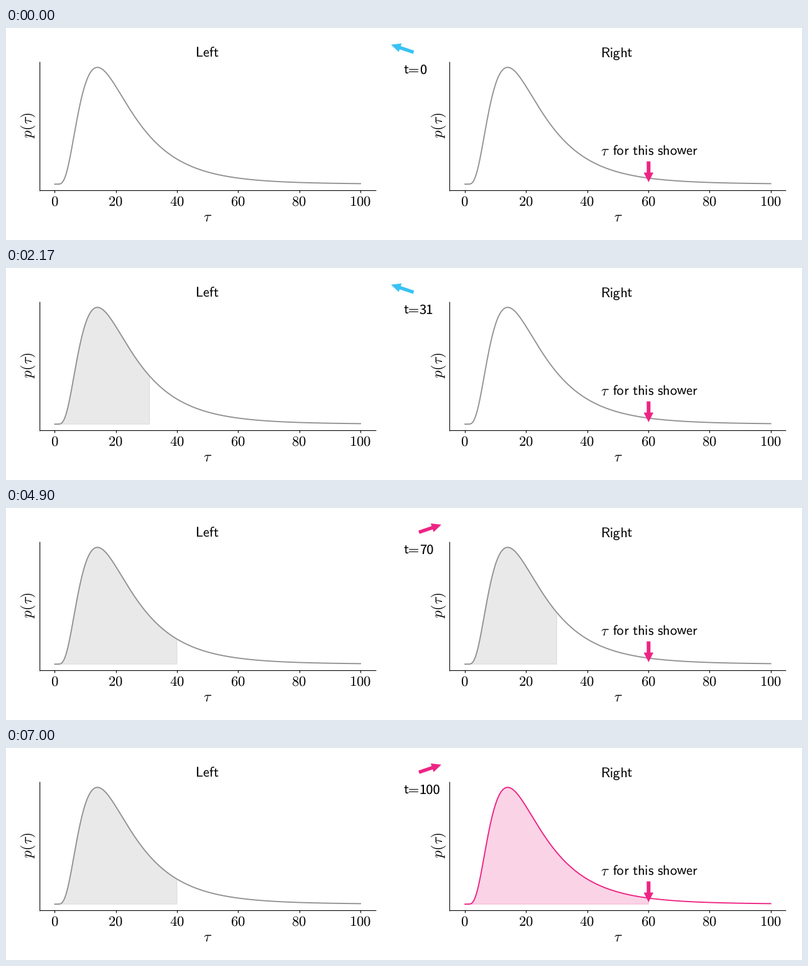
A matplotlib script that plays this animation: 1280x341 px, repeating every 7.7 s.

```python
import numpy as np
import matplotlib.pyplot as plt
from matplotlib.animation import FuncAnimation
from matplotlib.patches import Polygon, Rectangle

W, H, DPI = 1280, 341, 64
GREY, PINK, CYAN = "#929292", "#ee2484", "#3ac2f5"
SWITCH, END, HOLD = 40, 100, 9
BASE, PEAK = 251.2, 63.3
UNIT = 4.916
PX = 72 / DPI

plt.rcParams["mathtext.fontset"] = "cm"
plt.rcParams["text.hinting"] = "none"

fig = plt.figure(figsize=(W / DPI, H / DPI), dpi=DPI, facecolor="white")
ax = fig.add_axes([0, 0, 1, 1])
ax.set_xlim(0, W)
ax.set_ylim(H, 0)
ax.axis("off")


def label(x, y, s, size, ha="center", **kw):
    kw.setdefault("va", "baseline")
    return ax.text(x, y, f"${s}$", fontsize=size * PX, ha=ha, **kw)


def line(xs, ys, color="black", width=1.1, **kw):
    return ax.plot(xs, ys, color=color, lw=width * PX, **kw)[0]


def arrow(tail, tip, color, shaft=5.6, head=14.6, length=15.5):
    tail, tip = np.array(tail), np.array(tip)
    d = (tip - tail) / np.hypot(*(tip - tail))
    n = np.array([-d[1], d[0]])
    neck = tip - d * length
    a, b = n * shaft / 2, n * head / 2
    pts = [tail + a, neck + a, neck + b, tip, neck - b, neck - a, tail - a]
    return ax.add_patch(Polygon(pts, fc=color, ec="none", zorder=4))


def density(tau):
    """Log-normal curve with sigma 0.6 and median 20, scaled to peak at 1."""
    mode = 20 * np.exp(-0.36)
    u = np.log(np.maximum(tau, 1e-6) / mode)
    return np.exp(-u**2 / 0.72)


class Panel:
    def __init__(self, left, zero, title):
        self.zero = zero
        line([left, left], [54, 261.5], solid_capstyle="butt")
        line([left, left + 541], [261, 261], solid_capstyle="butt")
        for v in range(0, 101, 20):
            x = zero + v * UNIT
            line([x, x], [261, 265], solid_capstyle="butt")
            label(x - 0.4, 285, rf"\mathrm{{{v}}}", 22.8)
        label(zero + 246, 311, r"\tau", 24)
        label(zero - 42, 156, r"p(\tau)", 24, va="center", rotation=90)
        label(zero + 244.6, 47, rf"\mathsf{{{title}}}", 22.6)
        self.curve = line(*self.points(100), GREY, 1.9, zorder=3)
        self.fill = ax.add_patch(
            Polygon([[0, 0]], alpha=0.2, lw=1.3 * PX, zorder=1))

    def points(self, end):
        tau = np.linspace(0, end, 600)
        return self.zero + tau * UNIT, BASE - (BASE - PEAK) * density(tau)

    def show(self, end, color):
        x, y = self.points(end)
        x = np.r_[x, x[-1], x[0]]
        y = np.r_[y, BASE, BASE]
        self.fill.set_xy(np.c_[x, y])
        self.fill.set_color(color)
        self.fill.set_visible(end > 0)
        self.curve.set_color(color)


left = Panel(54, 78.4, "Left")
right = Panel(713, 738.1, "Right")

label(956, 204.5, r"\tau", 24, "left")
label(975, 204.5, r"\mathsf{for\ this\ shower}", 22.4, "left")
arrow((1033.3, 214.5), (1033.3, 248), PINK, 6, 15.6)
look_left = arrow((655.5, 39), (619.2, 26.8), CYAN)
look_right = arrow((664, 39), (700, 26.8), PINK)

label(638.8, 74, r"\mathsf{t}", 22.5, "left")
for y in (65.7, 69.5):
    ax.add_patch(Rectangle((648.3, y), 15, 1.5, fc="black", ec="none"))
clock = ax.text(664.8, 74, "0", fontsize=20.3 * PX, va="baseline",
                family="Noto Sans CJK JP")


def update(k):
    t = min(k, END)
    clock.set_text(str(t))
    look_left.set_visible(t <= SWITCH)
    look_right.set_visible(t > SWITCH)
    left.show(min(t, SWITCH), GREY)
    right.show(max(t - SWITCH, 0), PINK if t == END else GREY)
    return []


anim = FuncAnimation(fig, update, frames=END + 1 + HOLD, interval=70,
                     init_func=lambda: update(0), repeat=True, repeat_delay=0)
plt.show()
```
